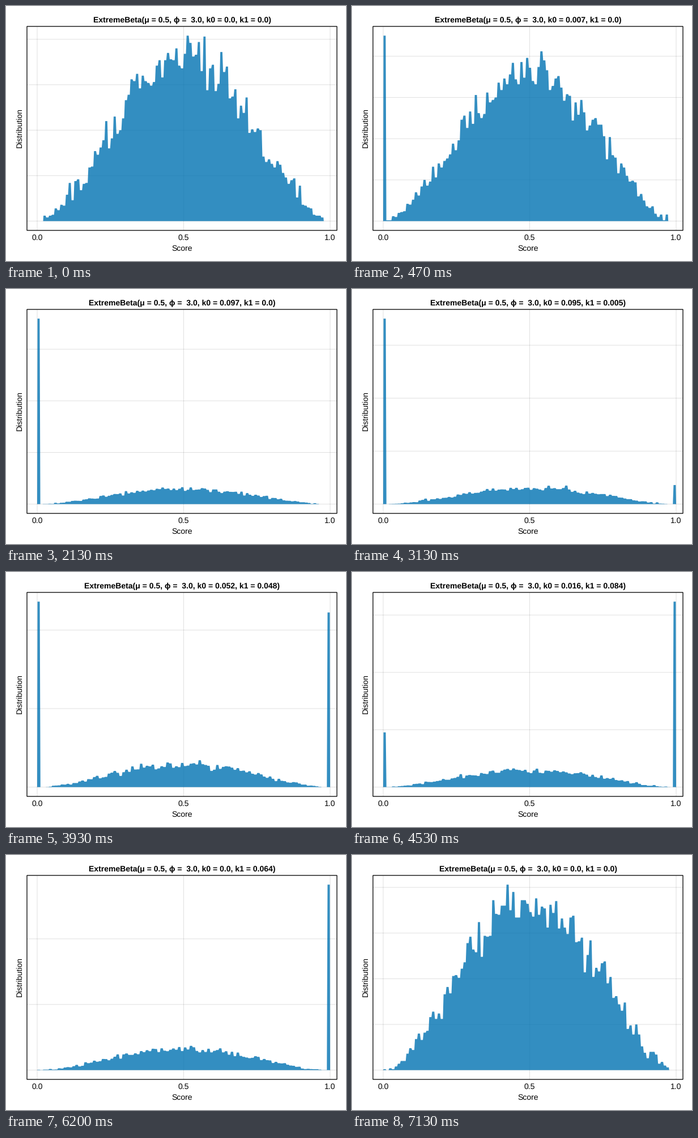
Recreate the animation shown at these times as a matplotlib script. Size 600 px wide and 450 px high, loop 8000 ms.

```python
import math

import numpy as np
import matplotlib.pyplot as plt
from matplotlib.animation import FuncAnimation
from matplotlib.collections import LineCollection
from matplotlib.patches import Rectangle

LOOP, INTERVAL = 8000, 40
STEPS = 120  # parameter steps per loop, 15 per second
N, BINS = 10000, 100
LEFT, RIGHT, TOP, BOTTOM = 37, 584, 36, 396
X0, X1 = 55, 572
BASE, PEAK = 379.6, 52.3
SLANT = 0.6  # inward lean of the bar sides, in pixels
PT = 0.72    # points per pixel at 100 dpi

# Steps in which a parameter change is running; the picture rests between them.
ACTIVE = ((0, 35), (42, 77), (84, 107))

plt.rcParams["text.hinting"] = "none"


def ease(t, start, stop):
    u = min(max((t - start) / (stop - start), 0), 1)
    return (1 - math.cos(math.pi * u)) / 2


def params(step):
    t = step / (STEPS - 1)
    swap = ease(t, 0.35, 0.65)
    k0 = 0.1 * (ease(t, 0, 0.3) - swap)
    k1 = 0.1 * (swap - ease(t, 0.7, 0.9))
    return max(k0, 0.0), max(k1, 0.0)


def step_at(frame):
    """Latest step that has drawn a new sample by this frame."""
    step = int((frame * INTERVAL + 14) * STEPS / LOOP)
    return max(min(step, stop) for start, stop in ACTIVE if step >= start)


def histogram(step):
    """Beta scores with point masses at 0 and 1, counted in equal bins."""
    p0, p1 = (0.3787 * k / (k + 0.108) for k in params(step))
    shared = N * (1 - 3 * p0 * p1)
    zeros = max(round(p0 * shared), min(step, 1))
    ones = round(p1 * shared)
    body = np.random.default_rng(step).beta(3, 3, N - zeros - ones)
    return np.histogram(np.r_[np.zeros(zeros), body, np.ones(ones)], BINS)


def tick_step(peak):
    for limit, size in ((290, 50), (560, 100), (952, 200)):
        if peak < limit:
            return size
    return 500


def to_y(counts, peak):
    return BASE - counts / peak * (BASE - PEAK)


def outline(counts, edges):
    x = np.repeat(X0 + edges * (X1 - X0), 2)
    x[1:-1] += np.tile([SLANT, -SLANT], len(counts))
    heights = np.r_[0, np.repeat(counts, 2), 0]
    return np.column_stack([x, to_y(heights, counts.max())])


fig = plt.figure(figsize=(6, 4.5), dpi=100, facecolor="white")
ax = fig.add_axes([0, 0, 1, 1])
ax.set(xlim=(0, 600), ylim=(450, 0))
ax.axis("off")


def label(x, y, text, **style):
    return ax.text(x, y, text, fontsize=14 * PT, color="black", ha="center",
                   va="baseline", family=["Liberation Sans", "DejaVu Sans"], **style)


def grid(lines):
    return ax.add_collection(LineCollection(
        lines, colors=[(0, 0, 0, 0.12)], linewidths=PT, snap=False, zorder=1))


grid([[(x, TOP), (x, BOTTOM)] for x in (X0, (X0 + X1) / 2, X1)])
rows = grid([])
bars, = ax.fill([0, 0, 0], [0, 0, 0], color="#0072B2", alpha=0.8, lw=0, zorder=2)
ax.add_patch(Rectangle((LEFT, TOP), RIGHT - LEFT, BOTTOM - TOP, fill=False,
                       ec="black", lw=1.3 * PT, snap=False, zorder=3))

title = label(310.5, 29, "", weight="bold")
for value in (0.0, 0.5, 1.0):
    label(X0 + value * (X1 - X0), 413, str(value))
label(310.5, 432, "Score")
label(28, 215, "Distribution", rotation=90, rotation_mode="anchor")


def draw(frame):
    step = step_at(frame)
    counts, edges = histogram(step)
    peak = counts.max()
    levels = np.arange(0, peak * 1.05, tick_step(peak))
    rows.set_segments([[(LEFT, y), (RIGHT, y)] for y in to_y(levels, peak)])
    bars.set_xy(outline(counts, edges))
    k0, k1 = (round(k, 3) for k in params(step))
    title.set_text(f"ExtremeBeta(μ = 0.5, ϕ =  3.0, k0 = {k0}, k1 = {k1})")
    return rows, bars, title


anim = FuncAnimation(fig, draw, frames=LOOP // INTERVAL, interval=INTERVAL,
                     repeat=True, repeat_delay=0, blit=False)
plt.show()
```
